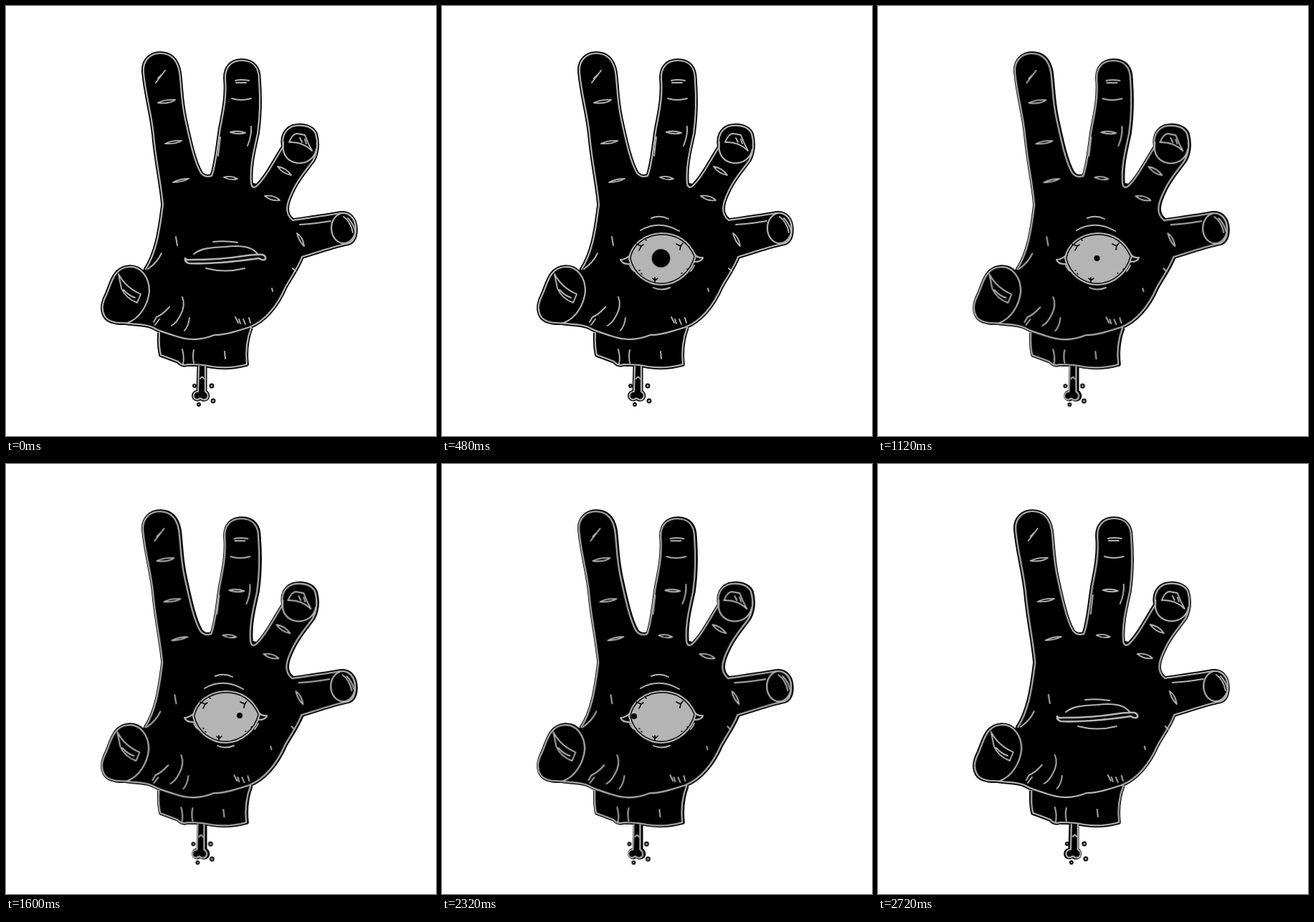
Write an HTML page without scripts that moves like this. It is 600 px wide and 600 px high and loops after 2.8 s.

```html
<!DOCTYPE html>
<html lang="en">
<head>
<meta charset="utf-8">
<title>Hand with an eye</title>
<style>
html, body { margin: 0; width: 100%; height: 100%; overflow: hidden; background: #fff; }
svg { display: block; width: 100vw; height: 100vh; }
.rim { fill: #000; stroke: #000; stroke-width: 5.6; stroke-linejoin: round; }
.line { fill: none; stroke: #b4b4b4; stroke-width: 2.2; stroke-linecap: round; stroke-linejoin: round; }
.solid { fill: #000; }
.fine { stroke-width: 1.9; }
.ball { fill: #b4b4b4; stroke: none; }
.pale { fill: #c4c4c4; stroke: none; }
.vein { fill: none; stroke: #000; stroke-width: 1.6; stroke-linecap: round; }

/* line boil: three drawings, 80 ms each */
.boil { animation: boil 240ms step-end infinite; }
.contour { animation: contour 240ms step-end infinite; }
@keyframes boil { 33.3% { transform: translate(.8px, 0); } 66.6% { transform: translate(-1.6px, .2px); } }
@keyframes contour { 33.3% { transform: translate(.3px, 0); } 66.6% { transform: translate(-.8px, .2px); } }

.closed, .half, .wide, .gaze, .pupil, .swirl, .big { animation: 2800ms step-end infinite; }
.closed { animation-name: closed; }
.half { animation-name: half; }
.wide { animation-name: wide; }
.gaze { animation-name: gaze; }
.pupil { animation-name: pupil; }
.swirl { animation-name: swirl; }
.big { animation-name: big; }
@keyframes closed {
  0%, 48.57%, 94.28% { visibility: visible; }
  5.71%, 51.42% { visibility: hidden; }
}
@keyframes half {
  0%, 11.42%, 48.57%, 54.28%, 94.28% { visibility: hidden; }
  5.71%, 45.71%, 51.42%, 91.42% { visibility: visible; }
}
@keyframes wide {
  0%, 45.71%, 91.42% { visibility: hidden; }
  11.42%, 54.28% { visibility: visible; }
}
@keyframes big { 0% { opacity: 1; } 11.42%, 100% { opacity: 0; } }
@keyframes pupil {
  0% { transform: scale(4.5); }
  14.28% { transform: scale(4.2); }
  17.14% { transform: scale(3.2); }
  20% { transform: scale(2.2); }
  22.85% { transform: scale(1.4); }
  25.71%, 100% { transform: scale(1); }
}
@keyframes swirl { 0%, 28.57%, 100% { opacity: 0; } 22.85% { opacity: 1; } }
@keyframes gaze {
  0%, 88.57%, 100% { transform: translate(305.5px, 352px); }
  57.14% { transform: translate(326px, 351px); }
  60% { transform: translate(344px, 350.5px); }
  74.28% { transform: translate(326px, 351px); }
  77.14% { transform: translate(288px, 352px); }
  80% { transform: translate(268px, 352px); }
}
</style>
</head>
<body>
<svg viewBox="0 0 600 600">
  <defs>
    <g id="hand">
      <path d="M195 367C209 345 214 318 219 277C216 245 209 215 206 180C203 150 195 125 192 93C190 76 202 66 215 66C231 66 239 76 242 92C245 115 244 130 250 158C257 190 263 218 272 233Q278 240 287 237"/>
      <path d="M287 237C293 222 295 195 299 170C304 145 308 125 306 102C305 86 314 76 329 76C345 76 353 86 353 103C355 130 355 150 351 178C345 205 340 225 342 248Q344 256 350 251"/>
      <path d="M350 251C362 240 372 220 387 196C384 182 390 172 400 168C415 164 428 169 432 178C436 192 434 205 429 215C420 228 408 240 400 258C390 278 389 290 400 299"/>
      <path d="M400 299C420 296 445 293 466 289C480 287 488 298 488 312C488 325 483 331 474 332C452 337 430 345 413 350"/>
      <path d="M413 350C409 362 398 378 390 392C378 420 360 440 340 448C318 455 305 459 291 459C270 467 255 467 235 460C222 456 212 453 206 449C195 443 180 445 165 442"/>
    </g>
    <path id="thumb" d="M172 364C188 363 200 378 200 398C198 418 186 436 170 442C155 443 143 441 138 433C132 423 135 413 140 403C147 388 150 365 172 364Z"/>
    <path id="wrist" d="M214 456Q213 475 216 487Q230 492 240 496Q246 503 254 500Q275 500 287 503Q310 507 336 500Q333 472 342 449"/>
    <path id="bone" d="M269 503L268 538C260 538 259 550 268 549Q271 546 274 549C283 551 284 541 278 538L278 503"/>
    <path id="almond" d="M260 350C272 338 288 335 306 335C330 333 342 340 353 350C343 365 328 370 306 370C285 371 269 364 260 355Z"/>
    <path id="globe" d="M261 352C264 333 282 318 306 317C332 317 346 331 354 349C349 371 330 388 307 389C286 389 266 375 261 352Z"/>
    <g id="corners">
      <path d="M261 349Q255 354 249 354Q252 361 263 360"/>
      <path d="M353 347Q357 352 364 351Q363 357 352 357"/>
    </g>
    <clipPath id="lids"><use href="#almond"/></clipPath>
  </defs>

  <g class="rim">
    <use href="#wrist"/>
    <use href="#hand"/>
    <path d="M195 367L287 237L350 251L400 299L413 350L340 448L165 442Z"/>
    <use href="#thumb"/>
    <use href="#bone" stroke-width="5"/>
  </g>

  <g class="line contour">
    <use href="#wrist"/>
    <use href="#hand"/>
    <use href="#thumb" class="solid"/>
    <path d="M387 190C381 226 428 228 433 200"/>
    <ellipse cx="471" cy="310" rx="17" ry="21"/>
  </g>

  <g class="line boil fine">
    <!-- nails -->
    <path d="M157 374Q167 393 188 402L183 414Q167 408 161 394ZM164 396Q171 404 180 407"/>
    <path d="M395 190Q400 178 406 178L417 180Q421 191 427 202Q414 189 395 190M410 184L413 190M417 186L419 192"/>
    <path d="M471 294Q481 301 484 316M477 296Q485 304 487 314"/>
    <!-- knuckles -->
    <path d="M209 107L222 90M212 101L217 96"/>
    <path d="M212 135Q222 130 236 131Q228 137 212 135Z"/>
    <path d="M222 192Q232 187 245 188Q237 193 222 192Z"/>
    <path d="M233 246Q242 241 255 241Q246 246 233 246Z"/>
    <path d="M320 104Q328 102 339 104M321 107L335 107M315 129Q328 133 342 129"/>
    <path d="M313 176Q323 173 334 177Q324 180 313 176Z"/>
    <path d="M304 239Q314 236 323 241Q314 244 304 239Z"/>
    <path d="M379 224Q391 226 398 236Q386 234 379 224Z"/>
    <path d="M361 265Q374 263 382 271Q371 273 361 265Z"/>
    <path d="M406 317Q414 322 416 335Q409 329 406 317Z"/>
    <path d="M342 168Q343 181 337 195M299 183L296 209M410 305Q430 304 453 300"/>
    <!-- palm and wrist -->
    <path d="M237 322L239 334M217 345Q211 358 198 367M371 394L372 398M400 366L404 370"/>
    <path d="M246 406Q251 418 243 432Q238 442 231 446M256 435Q255 446 249 453M228 420Q218 431 210 434L206 441M214 437L208 445"/>
    <path d="M320 434L324 442M325 437L327 443M331 437L334 444M339 435L341 442"/>
    <path d="M246 479Q249 490 247 500M262 480Q260 488 262 498M305 482L306 492"/>
  </g>

  <g class="line boil">
    <use href="#bone"/>
    <path class="fine" d="M271 520Q274 515 276 520"/>
    <g fill="#b4b4b4" stroke="#000" stroke-width="1.800">
      <circle cx="263" cy="530" r="2"/>
      <circle cx="287" cy="530" r="2.500"/>
      <circle cx="289" cy="551" r="2.500"/>
      <circle cx="269" cy="556" r="2"/>
    </g>
  </g>

  <g class="line closed">
    <path d="M262 346C272 338 285 337 306 336C330 333 344 336 351 346"/>
    <path stroke-width="2.600" d="M250 352Q251 355 258 354Q300 354 330 349Q350 346 358 347Q363 349 362 353Q359 356 353 352Q325 356 300 358Q270 360 255 359Q249 357 250 352Z"/>
    <path class="fine" d="M289 329Q306 327 323 330M279 366Q306 373 333 366"/>
  </g>

  <g class="line half">
    <use href="#almond" class="ball"/>
    <use href="#almond" class="pale big"/>
    <g clip-path="url(#lids)">
      <g class="gaze"><circle class="pupil" r="4" fill="#000" stroke="none"/></g>
    </g>
    <use href="#almond" stroke="#000" stroke-width="4"/>
    <use href="#almond"/>
    <use href="#corners"/>
    <path class="vein" d="M268 358L269 358M277 361L278 361M284 364L285 364M338 360L339 360M345 356L346 356"/>
    <path class="fine" d="M278 322Q305 312 333 322M290 302Q302 298 314 303M267 370Q278 375 291 375M334 373Q343 370 348 364M288 386Q304 391 321 386"/>
  </g>

  <g class="line wide">
    <use href="#globe" class="ball"/>
    <use href="#globe" stroke="#000" stroke-width="5"/>
    <use href="#globe"/>
    <use href="#corners"/>
    <path class="vein" d="M271 332L278 335L281 333M278 335L275 341M327 332L333 335L336 331M333 335L332 340M297 386L297 379M294 380L297 383L301 380"/>
    <path class="vein" d="M284 326L285 327M278 373L279 374M334 373L335 373M275 369L276 369M342 367L343 367"/>
    <path class="vein swirl" d="M299 344Q297 348 299 351M313 353Q314 357 310 359"/>
    <g class="gaze"><circle class="pupil" r="4" fill="#000" stroke="none"/></g>
    <path class="fine" d="M277 313Q303 298 331 314M292 296Q304 291 316 297M295 393Q306 398 318 393M262 362Q265 368 268 370M352 362Q350 367 347 370"/>
  </g>
</svg>
</body>
</html>
```
